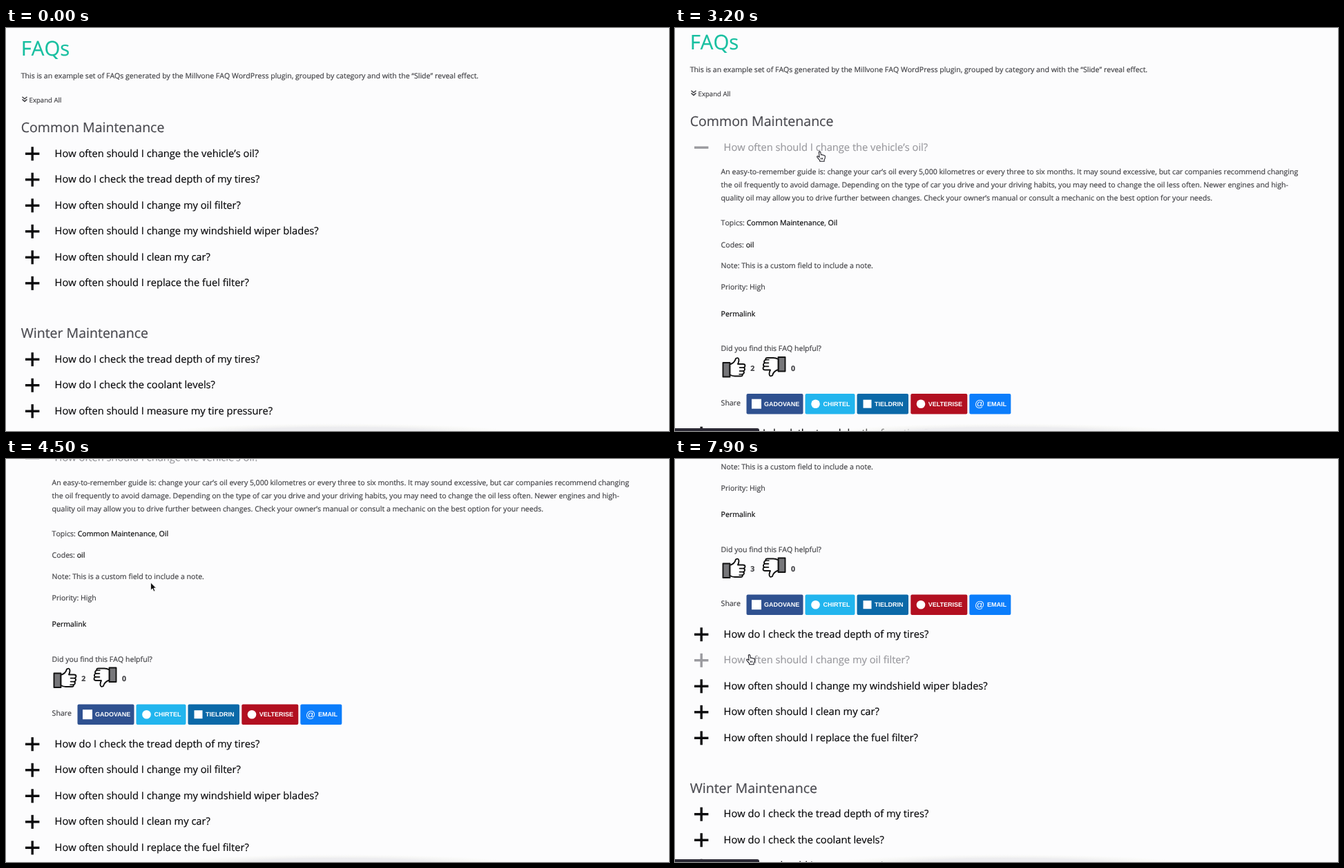
Write an HTML page that moves like this. It is 960 px wide and 584 px high and loops after 8000 ms.

```html
<!DOCTYPE html>
<html lang="en">
<head>
<meta charset="utf-8">
<title>FAQs</title>
<style>
  html, body { margin: 0; width: 100%; height: 100%; overflow: hidden; background: #fcfcfd; }
  svg { display: block; }
  text {
    font-family: "Open Sans", sans-serif; font-size: 10.58px; font-kerning: none;
    color: #434347; fill: currentColor; stroke: currentColor; stroke-width: .2;
    text-rendering: geometricPrecision; white-space: pre;
  }
  .title { font-size: 29.4px; color: #17bfa0; }
  .intro { font-size: 10.55px; }
  .head { font-size: 19.55px; color: #4a4a50; }
  .small { font-size: 9.6px; }
  .row { color: #0b0b0d; }
  .row.hover { color: #9a9a9f; }
  .row text { font-size: 14.67px; color: inherit; }
  .row path { stroke: currentColor; stroke-width: 3.4; }
  .link { color: #0b0b0d; fill: currentColor; stroke: currentColor; }
  .count { font-weight: 700; }
  .btn text { font: 700 9px "Liberation Sans", Arial, sans-serif; color: #fff; stroke: none; }
  .btn .at { font-weight: 400; font-size: 14px; }
</style>
</head>
<body>
<svg id="stage" width="960" height="584" viewBox="0 0 960 584">
  <defs>
    <radialGradient id="fade">
      <stop offset=".55" stop-color="#ececef"/>
      <stop offset="1" stop-color="#f6f6ee" stop-opacity="0"/>
    </radialGradient>
    <clipPath id="reveal"><rect id="window" x="0" y="200" width="960" height="0"/></clipPath>
    <g id="thumb" stroke="#111" stroke-width="1.9" stroke-linejoin="round" stroke-linecap="round">
      <path d="M1 8.5H11V29H1Z" fill="#77777a"/>
      <path d="M11 11C16 9.5 18.5 6.5 19.5 2.5Q23.5 0 24 4.5Q24 7.5 22.5 10.5H30Q33 10.5 33 13Q33 15 31 15.6Q33 16.5 32.4 18.8Q32 20.4 30.3 20.6Q32 21.8 31.2 23.6Q30.6 25 29 25.2Q30 28 26.5 28H18Q14.5 28 11 26Z" fill="#fff"/>
      <path d="M25 15.6H31M25 20.6H30.3M24.5 25.2H29" fill="none" stroke-width="1.6"/>
    </g>
  </defs>
  <rect width="960" height="584" fill="#fcfcfd"/>
  <g id="page">
    <g id="top"></g>
    <g id="answer" clip-path="url(#reveal)"></g>
    <g id="rest"></g>
  </g>
  <ellipse cx="481" cy="586" rx="256" ry="13" fill="url(#fade)"/>
  <path id="status" d="M0 580H119Q122 580 122 583V584H0Z" fill="#2b2935"/>
  <g id="cursor" stroke-linejoin="round">
    <path id="arrow" d="M0 0V11.2L2.6 8.8L4.5 13L6.4 12.2L4.6 8.1H8Z" fill="#111" stroke="#fff" stroke-width=".8"/>
    <path id="hand" d="M-1.2 .8Q0 -.6 1.2 .8L2 5Q3.2 4 4.2 5.2Q5.4 4.5 6.2 5.8Q7.8 5.4 7.9 7.4Q8 10.5 6.6 12V14.2H.2V12.8L-3.6 8.4Q-4.4 6.6 -2.6 6.6L-.4 8.2ZM2 9V11.5M4 9V11.5" fill="#fff" stroke="#22222a" stroke-width="1.1"/>
  </g>
</svg>
<script>
const $ = id => document.getElementById(id);
const add = (parent, markup) => parent.insertAdjacentHTML("beforeend", markup);
const text = (x, y, str, cls = "") => `<text x="${x}" y="${y}" class="${cls}">${str}</text>`;
const link = str => `<tspan class="link">${str}</tspan>`;

const LEFT = 21.7, INDENT = 66.6, STEP = 37.53, ANSWER_HEIGHT = 377;

function addRow(parent, y, label) {
  add(parent, `<g class="row"><path d="M28 ${y}H48.4"/><path class="bar" d="M38.2 ${y - 10}V${y + 10}"/>${text(70.6, y + 4.5, label)}</g>`);
  return parent.lastElementChild;
}

const intro = $("top"), rest = $("rest"), answer = $("answer");

add(intro,
  text(LEFT, 40, "FAQs", "title") +
  text(LEFT, 72.5, "This is an example set of FAQs generated by the Millvone FAQ WordPress plugin, grouped by category and with the “Slide” reveal effect.", "intro") +
  `<path d="M23.5 99.8L27 102.8L30.5 99.8M23.5 103.4L27 106.4L30.5 103.4" fill="none" stroke="#434347" stroke-width="1.5"/>` +
  text(33.6, 107.7, "Expand All", "small") +
  text(LEFT, 151, "Common Maintenance", "head"));

const rows = [addRow(intro, 182.2, "How often should I change the vehicle’s oil?")];
[
  "How do I check the tread depth of my tires?",
  "How often should I change my oil filter?",
  "How often should I change my windshield wiper blades?",
  "How often should I clean my car?",
  "How often should I replace the fuel filter?"
].forEach((label, i) => rows.push(addRow(rest, 182.2 + STEP * (i + 1), label)));

add(rest, text(LEFT, 449, "Winter Maintenance", "head"));
[
  "How do I check the tread depth of my tires?",
  "How do I check the coolant levels?",
  "How often should I measure my tire pressure?"
].forEach((label, i) => addRow(rest, 480.2 + STEP * i, label));

add(answer, [
  [221, "An easy-to-remember guide is: change your car’s oil every 5,000 kilometres or every three to six months. It may sound excessive, but car companies recommend changing"],
  [240.2, "the oil frequently to avoid damage. Depending on the type of car you drive and your driving habits, you may need to change the oil less often. Newer engines and high-"],
  [259.4, "quality oil may allow you to drive further between changes. Check your owner’s manual or consult a mechanic on the best option for your needs."],
  [295, "Topics: " + link("Common Maintenance") + ", " + link("Oil")],
  [326.8, "Codes: " + link("oil")],
  [357.3, "Note: This is a custom field to include a note."],
  [388, "Priority: High"],
  [426.5, link("Permalink")],
  [477, "Did you find this FAQ helpful?"],
  [555.5, "Share"]
].map(([y, str]) => text(INDENT, y, str)).join(""));

add(answer,
  `<use href="#thumb" x="68.5" y="485.5"/>` +
  `<use href="#thumb" transform="translate(160.5 515) rotate(180)"/>` +
  text(109.3, 505.7, "2", "count") + text(168, 505.7, "0", "count"));
const votes = answer.querySelector(".count");

const square = (x, s) => `<rect x="${x}" y="${553.7 - s / 2}" width="${s}" height="${s}" fill="#fff"/>`;
const disc = x => `<circle cx="${x}" cy="553.7" r="6.3" fill="#fff"/>`;
[
  [103.5, 82, "#2f5190", square(111, 14), 129, "GADOVANE"],
  [188.5, 72, "#22b5ee", disc(203.5), 214.6, "CHIRTEL"],
  [263.5, 74.5, "#0b69a8", square(272.5, 12), 289, "TIELDRIN"],
  [341.3, 82, "#b20f20", disc(356), 366.7, "VELTERISE"],
  [426.3, 60, "#0b7dfb", text(434, 558, "@", "at"), 452, "EMAIL"]
].forEach(([x, w, color, icon, tx, label]) => add(answer,
  `<g class="btn"><rect x="${x}" y="539" width="${w}" height="29.5" rx="2" fill="${color}"/>${icon}${text(tx, 556.9, label)}</g>`));

// Linear interpolation through [time, value] points, held at both ends.
function track(points, t) {
  if (t <= points[0][0]) return points[0][1];
  for (let i = 1; i < points.length; i++) {
    const [a, u] = points[i - 1], [b, v] = points[i];
    if (t <= b) return u + (v - u) * (t - a) / (b - a);
  }
  return points[points.length - 1][1];
}

const swing = p => (1 - Math.cos(Math.PI * Math.min(1, Math.max(0, p)))) / 2;

const SCROLL = [[3100, 0], [3300, 18], [3500, 62], [3800, 128], [4100, 170], [4400, 183.5],
  [6700, 183.5], [6900, 215], [7200, 284.5], [7400, 320], [7700, 342.5]];

// Pointer moves: start, end, from, to.
const MOVES = [
  [0, 800, [730, 590], [330, 115]],
  [1000, 1900, [330, 115], [209.5, 179]],
  [4600, 5400, [209.5, 179], [89.5, 320]],
  [7700, 7900, [89.5, 320], [107.5, 283.5]]
];

function pointer(t) {
  const [a, b, from, to] = MOVES.filter(m => m[0] <= t).pop();
  const p = swing((t - a) / (b - a));
  return from.map((v, i) => v + (to[i] - v) * p);
}

function hovered(t) {
  if (t >= 1700 && t < 4600) return 0;
  if (t >= 7800) return 2;
  return t >= 7700 ? 3 : -1;
}

const show = (el, on) => el.setAttribute("visibility", on ? "visible" : "hidden");

function draw(t) {
  const open = ANSWER_HEIGHT * swing((t - 2400) / 400);
  $("page").setAttribute("transform", `translate(0 ${-track(SCROLL, t)})`);
  $("window").setAttribute("height", open);
  rest.setAttribute("transform", `translate(0 ${open})`);
  show(rows[0].querySelector(".bar"), t < 2400);

  const over = hovered(t);
  rows.forEach((row, i) => row.classList.toggle("hover", i === over));
  votes.textContent = t < 6100 ? "2" : "3";
  show($("status"), (t >= 2000 && t < 4400) || t >= 7700);

  const hand = (t >= 1700 && t < 4400) || t >= 5200;
  show($("hand"), hand);
  show($("arrow"), !hand);
  $("cursor").setAttribute("transform", `translate(${pointer(t)})`);
}

function tick() {
  const t = performance.now() % 8000;
  draw(Math.floor(t / 100) * 100);
  requestAnimationFrame(tick);
}
tick();
</script>
</body>
</html>
```
